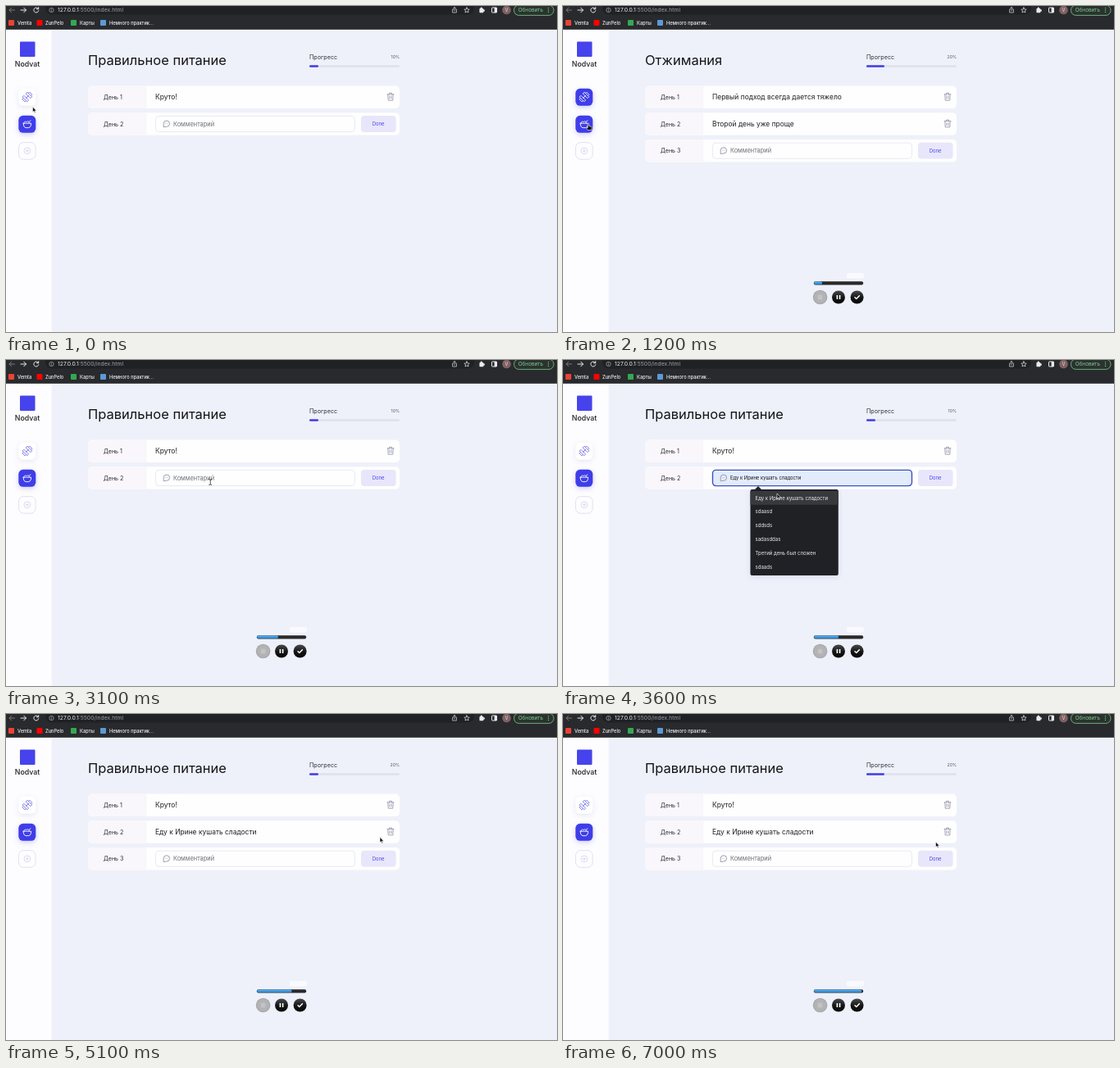
An HTML page that plays this animation: 672 by 398 pixels, repeating every 7.1 s.

```html
<!DOCTYPE html>
<html lang="ru">
<head>
<meta charset="utf-8">
<title>Трекер привычек</title>
<style>
html, body { margin: 0; width: 100%; height: 100%; overflow: hidden; background: #eef1fa; }
svg { display: block; width: 672px; height: 398px; }
text { font-family: Inter, "Open Sans", sans-serif; white-space: pre; }
.line { fill: none; stroke-linecap: round; stroke-linejoin: round; }
.soft { filter: drop-shadow(0 2px 3px rgba(90, 95, 190, .14)); }
.glow { filter: drop-shadow(0 2px 3px rgba(63, 61, 232, .25)); }
</style>
</head>
<body>
<svg viewBox="0 0 672 398" xmlns="http://www.w3.org/2000/svg">
  <defs>
    <linearGradient id="blue" x2="0" y2="1">
      <stop offset="0" stop-color="#6db9f0"/><stop offset="1" stop-color="#1877c9"/>
    </linearGradient>
    <linearGradient id="black" x2="0" y2="1">
      <stop offset="0" stop-color="#4a4a4c"/><stop offset=".55" stop-color="#151516"/><stop offset="1" stop-color="#050505"/>
    </linearGradient>
  </defs>
  <rect width="672" height="398" fill="#eef1fa"/>
  <rect y="28" width="55.6" height="370" fill="#fdfdff"/>
  <g id="chrome"></g>
  <g id="page"></g>
  <g id="recorder"></g>
  <g id="pointer"></g>
</svg>
<script>
const LOOP = 7100, STEP = 100;
const BLUE = '#3f3de8';
const TO_PUSHUPS = 700, TO_FOOD = 1700, FOCUS = 3300, PICK = 4100, SUBMIT = 5100;
const PHRASE = 'Еду к Ирине кушать сладости';
const HINTS = [PHRASE, 'sdaasd', 'sddsds', 'sadasddas', 'Третий день был сложен', 'sdaads'];

// Pointer tip: time, x, y
const PATH = [
  [0, 32.5, 123], [400, 29, 112], [700, 29, 112], [1200, 31, 144], [1800, 31, 144],
  [2500, 130, 152], [3000, 249, 149], [3300, 250, 149], [3600, 261, 163], [4100, 263, 165],
  [4600, 452, 158], [4900, 456, 148], [5100, 456, 150.3], [5600, 455, 155], [7000, 454.5, 156]
];

const $ = id => document.getElementById(id);
const text = (x, y, size, fill, s, extra = '') =>
  `<text x="${x}" y="${y}" font-size="${size}" fill="${fill}" ${extra}>${s}</text>`;
const rect = (x, y, w, h, r, fill, extra = '') =>
  `<rect x="${x}" y="${y}" width="${w}" height="${h}" rx="${r}" fill="${fill}" ${extra}/>`;
const circle = (x, y, r, fill, extra = '') =>
  `<circle cx="${x}" cy="${y}" r="${r}" fill="${fill}" ${extra}/>`;
const line = (d, color, w = 1) =>
  `<path class="line" d="${d}" stroke="${color}" stroke-width="${w}"/>`;
const at = (x, y, s, extra = '') => `<g transform="translate(${x} ${y}) ${extra}">${s}</g>`;
const ease = k => { k = Math.min(1, Math.max(0, k)); return k * k * (3 - 2 * k); };
const MID = 'text-anchor="middle"', END = 'text-anchor="end"', MEDIUM = 'font-weight="500"';

function drawChrome() {
  const pale = '#e8eaed', dim = '#9aa0a6', green = '#81c995';
  const marks = [[3, '#ea4335', 14, 'Vemta'], [37.5, '#f00', 48, 'ZunPelo'],
    [79, '#34a853', 90, 'Карты'], [115, '#5b9bd5', 126, 'Немного практик…']];
  $('chrome').innerHTML =
    rect(0, 0, 672, 28.8, 0, '#292a2d') +
    rect(48, -8, 523, 18.5, 8, '#202124') +
    line('M10.5 5H4M6.7 2.2L4 5L6.7 7.8', '#77797d') +
    line('M18 5H24.5M21.8 2.2L24.5 5L21.8 7.8', pale) +
    line('M39.3 3.2A3 3 0 1 0 39.8 5.7M39.7 1.6V3.8H37.5', pale) +
    circle(55.5, 5, 2.7, 'none', `stroke="${dim}" stroke-width=".8"`) +
    line('M55.5 4.9V6.4M55.5 3.4V3.5', dim, .8) +
    text(63, 7.2, 6.8, pale, `127.0.0.1<tspan fill="${dim}">:5500/index.html</tspan>`) +
    line('M545.4 4H544.6V8H549.4V4H548.6M547 6V1.5M545.6 2.8L547 1.5L548.4 2.8', '#c4c7cc', .8) +
    line('M562 1.8L562.9 4L565.2 4.2L563.5 5.7L564 8L562 6.8L560 8L560.5 5.7L558.8 4.2L561.1 4Z', pale, .7) +
    rect(577.4, 3, 5, 5.2, .8, pale) + circle(579.8, 2.8, 1.2, pale) + circle(582.7, 5.5, 1.2, pale) +
    rect(592.5, 2, 6, 6, .6, 'none', `stroke="${pale}"`) + rect(595.6, 2, 3, 6, 0, pale) +
    circle(610.5, 5, 5.3, '#7f6264') + text(610.5, 7.1, 5.8, '#eadfe0', 'V', MID) +
    rect(619.5, -1, 48.5, 12.4, 6, '#2a332e', `stroke="${green}" stroke-width=".8"`) +
    text(624.7, 7.2, 6.4, green, 'Обновить') +
    [2.6, 5, 7.4].map(y => circle(661.5, y, .7, green)).join('') +
    marks.map(([x, c, tx, s]) => rect(x, 17, 7, 7, 1, c) + text(tx, 22.6, 5.7, '#f1f2f4', s, MEDIUM)).join('');
}

const dumbbell = c => at(25.9, 111, [-1, 1].map(k => `<g transform="scale(${k} 1)">` +
  line('M2 -4H4.2V4H2ZM4.2 -2.2H6.2V2.2H4.2', c, .8) + '</g>').join('') +
  line('M-2 0H2', c, .9), 'rotate(-45)');

const bowl = c => at(25.9, 144.2,
  line('M-4.7 -1H4.7C4.9 1.6 3.6 4.4 1.8 4.4H-1.8C-3.6 4.4 -4.9 1.6 -4.7 -1Z', c, .9) +
  line('M-3.8 -1.2C-3.8 -3.6 -1.6 -3.8 -.9 -2.4C0 -4.2 2.6 -3.7 2.5 -1.2M2 -2.7L4.2 -4.4', c, .8));

function drawNav(pushups, p) {
  const over = y => p.x > 15 && p.x < 37 && p.y > y && p.y < y + 21.5;
  const button = (y, on, icon) =>
    rect(15.3, y + .3, 21, 21, 5.5, on ? BLUE : '#fff', `class="${on ? 'glow' : 'soft'}"`) +
    icon(on ? '#fff' : '#6a66e6');
  return rect(17, 43.5, 18.5, 18.5, 1, '#4643ec') +
    text(26, 74, 8.8, '#222', 'Nodvat', `${MID} ${MEDIUM}`) +
    button(100.5, pushups || over(100.5), dumbbell) +
    button(133.5, !pushups || over(133.5), bowl) +
    rect(15.5, 166.6, 20.6, 20.6, 6, '#fdfdff', 'stroke="#dad8f0" stroke-width=".8"') +
    circle(25.9, 176.8, 3.9, 'none', 'stroke="#d3d1ec" stroke-width=".8"') +
    line('M24.2 176.8H27.6M25.9 175.1V178.5', '#d3d1ec', .8);
}

const trash = y => at(469, y,
  line('M-4 -2.9H4M-1.5 -3V-4.5H1.5V-3M-3.2 -2.9L-2.8 4.4H2.8L3.2 -2.9M-1.1 -.8V2.3M1.1 -.8V2.3', '#8f91a8', .8));

const rowBase = (y, day) =>
  rect(100, y - 13.8, 380, 27.6, 5, '#fefefe') +
  `<path d="M170 ${y - 13.8}H105a5 5 0 0 0 -5 5v17.6a5 5 0 0 0 5 5H170Z" fill="#f9f7fb"/>` +
  line(`M170.3 ${y - 13.4}V${y + 13.4}`, '#f2f2f8', .8) +
  text(119, y + 2.6, 7.1, '#2b2b31', 'День ' + day);

const noteRow = (y, day, s) =>
  rowBase(y, day) + text(182, y + 2.9, 8.45, '#1f1f24', s) + trash(y - .5);

function formRow(y, day, mode) {
  const frame = mode ? 'stroke="#3b50c4" stroke-width="1.4"' : 'stroke="#e3e5f1" stroke-width=".8"';
  const fill = mode > 1 ? '#e3ecfb' : '#fefefe';
  const hint = text(204, y + 2.5, 7.4, '#6f7078', 'Комментарий');
  const label = [
    hint,
    hint,
    text(204, y + 2.2, 5.9, '#111', PHRASE),
    text(204, y + 2.5, 7.3, '#222', PHRASE + '<tspan font-weight="300">|</tspan>')
  ][mode];
  return rowBase(y, day) +
    rect(182.5, y - 9.6, 243, 19.2, 4, fill, frame) +
    at(195.8, y - .4, line('M-3.6 3.8V0A3.7 3.7 0 1 1 0 3.8Z', '#85879c', .8) +
      line('M-1.4 0H-1.3M0 0H.1M1.4 0H1.5', '#a3a5b6', .6)) +
    label +
    rect(433, y - 9.9, 42.6, 19.8, 4, '#e8e6fb') +
    text(454.2, y + 2.1, 5.9, '#4a47e4', 'Done', MID);
}

function drawHints(hover) {
  return '<path d="M233.5 158.5L238 154L242.5 158.5Z" fill="#202124"/>' +
    rect(228.5, 158, 107.3, 105, 2, '#202124', 'class="soft"') +
    (hover ? rect(228.5, 160, 107.3, 16.8, 0, '#37393c') : '') +
    HINTS.map((s, i) => text(234.5, 170.6 + i * 16.85, 6.05, '#e8eaed', s)).join('');
}

function drawPage(t, p) {
  const pushups = t >= TO_PUSHUPS && t < TO_FOOD;
  const done = t >= SUBMIT;
  const rows = pushups ? ['Первый подход всегда дается тяжело', 'Второй день уже проще']
    : done ? ['Круто!', PHRASE] : ['Круто!'];
  const open = t >= FOCUS && t < PICK;
  const hover = open && p.y > 160;
  const mode = done || t < FOCUS ? 0 : t >= PICK ? 3 : hover ? 2 : 1;
  const part = 1 + ease((t - TO_PUSHUPS) / 500) - ease((t - TO_FOOD) / 500) + ease((t - SUBMIT) / 500);
  const rowY = i => 111.3 + i * 32.7;
  return drawNav(pushups, p) +
    text(100, 71.8, 16.5, '#151518', pushups ? 'Отжимания' : 'Правильное питание') +
    text(370, 65.3, 7.2, '#333338', 'Прогресс') +
    text(480, 64, 5.2, '#55565e', rows.length * 10 + '%', END) +
    rect(370, 72.2, 110, 2.5, 1.2, '#dfe1ea') +
    rect(370, 72.2, 11 * part, 2.5, 1.2, BLUE) +
    rows.map((s, i) => noteRow(rowY(i), i + 1, s)).join('') +
    formRow(rowY(rows.length), rows.length + 1, mode) +
    (open ? drawHints(hover) : '');
}

function drawRecorder(t) {
  if (t < STEP) return '';
  return rect(346, 326, 21, 6.5, 2, '#f9faff') +
    rect(305.8, 336.2, 60.4, 4.2, 2, '#29292b') +
    rect(306.2, 336.6, t * .0083, 3.4, 1.5, 'url(#blue)') +
    circle(313.6, 355.5, 8.8, '#a9a9ab') + circle(313.6, 355.5, 7.5, '#b3b3b5') +
    rect(310.8, 352.8, 5.6, 5.6, 1, '#c3c3c5') +
    circle(336, 355.5, 8, 'url(#black)') + circle(358.6, 355.5, 8, 'url(#black)') +
    rect(333.6, 352.9, 1.6, 5.2, .3, '#fff') + rect(336.8, 352.9, 1.6, 5.2, .3, '#fff') +
    line('M356 355.7L357.8 357.5L361.4 353.7', '#fff', 1.5);
}

function pointerAt(t) {
  const i = Math.max(1, PATH.findIndex(k => k[0] >= t));
  const [a, b] = [PATH[i - 1], PATH[i]];
  const k = ease((t - a[0]) / (b[0] - a[0]));
  return { x: a[1] + (b[1] - a[1]) * k, y: a[2] + (b[2] - a[2]) * k };
}

function drawPointer(t, { x, y }) {
  const within = (l, u, r, d) => x > l && x < r && y > u && y < d;
  const form = t < SUBMIT && !(t >= TO_PUSHUPS && t < TO_FOOD);
  const ink = 'fill="#111" stroke="#fff" stroke-width=".6" stroke-linejoin="round"';
  if (form && within(182, 134, 426, 154))
    return at(x, y, line('M-1.5 -3.5Q0 -3.5 0 -2.5Q0 -3.5 1.5 -3.5M0 -2.5V2.5M-1.5 3.5Q0 3.5 0 2.5Q0 3.5 1.5 3.5', '#333', .8));
  if (within(15, 100.5, 37, 122) || within(15, 133.5, 37, 155) || form && within(433, 134, 476, 154))
    return at(x, y, `<path d="M-.8 0Q0 -.8 .8 0V2.6L3.6 3.3Q4.4 3.6 4.2 4.6L3.6 7.6H-.6L-2.8 4.8Q-2.6 3.7 -.8 4.8Z" ${ink}/>`);
  return at(x, y, `<path d="M0 0V6.6L1.5 5.3L2.5 7.6L3.6 7.1L2.6 4.9H4.7Z" ${ink}/>`);
}

let last = -1;
function render(now) {
  const t = Math.floor(now % LOOP / STEP) * STEP;
  if (t !== last) {
    last = t;
    const p = pointerAt(t);
    $('page').innerHTML = drawPage(t, p);
    $('recorder').innerHTML = drawRecorder(t);
    $('pointer').innerHTML = drawPointer(t, p);
  }
}

drawChrome();
render(0);
let start;
requestAnimationFrame(function tick(now) {
  start ??= now;
  render(now - start);
  requestAnimationFrame(tick);
});
</script>
</body>
</html>
```
